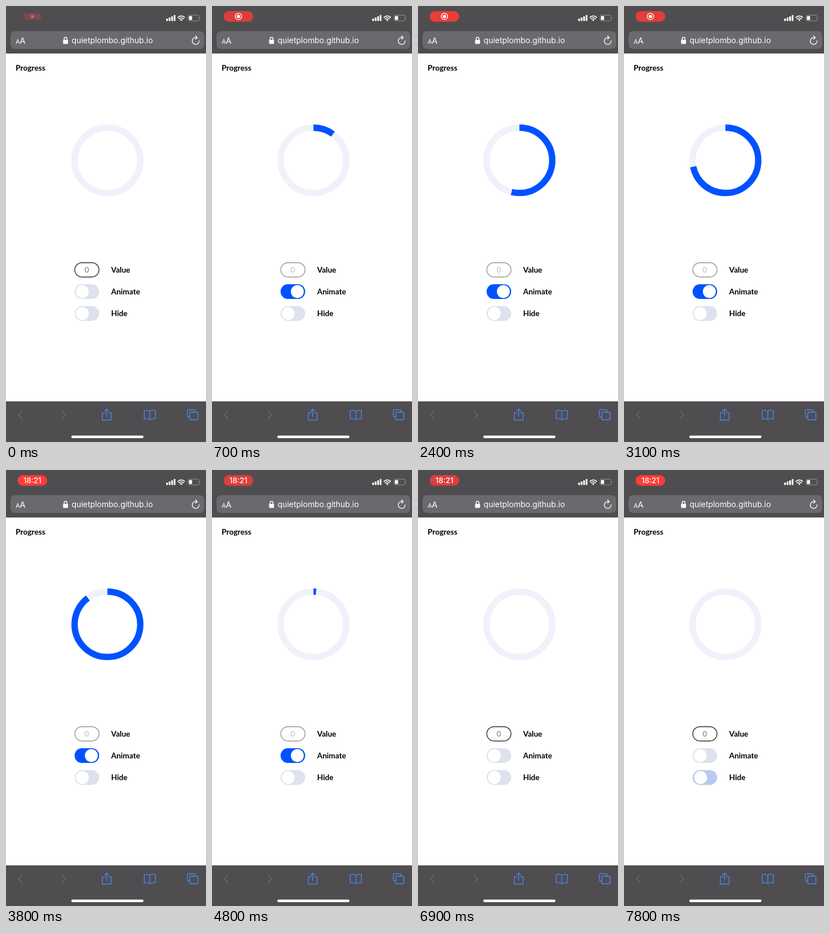
Animation of 352 by 762 pixels, one loop 8000 ms. Source, as an HTML page:

```html
<!DOCTYPE html>
<html lang="en">
<head>
<meta charset="utf-8">
<title>Progress</title>
<style>
  html, body { margin: 0; width: 100%; height: 100%; overflow: hidden; background: #fff; }
  svg { display: block; width: 100vw; height: 100vh; }
  .label { font: 700 13.6px Lato, sans-serif; fill: #000; }
  .ui { font-family: Inter, Roboto, sans-serif; fill: #fff; }
  .line { fill: none; stroke-linecap: round; stroke-linejoin: round; }
</style>
</head>
<body>
<svg viewBox="0 0 352 762">
  <rect width="352" height="762" fill="#fff"/>
  <path d="M0 0H352V83H0ZM0 691H352V762H0Z" fill="#4f4d50"/>

  <!-- status bar -->
  <g id="pill">
    <rect x="20.5" y="9" width="52" height="18.5" rx="9" fill="#ff3b36"/>
    <g id="dot">
      <circle cx="46.5" cy="18.2" r="5.6" fill="none" stroke="#fff" stroke-width="1.3"/>
      <circle cx="46.5" cy="18.2" r="3" fill="#fff"/>
    </g>
    <text id="clock" class="ui" x="46.5" y="23" font-size="13.2" font-weight="500" text-anchor="middle">18:21</text>
  </g>
  <g fill="#fff">
    <rect x="282" y="22" width="3" height="4.2" rx=".8"/>
    <rect x="286.4" y="20" width="3" height="6.2" rx=".8"/>
    <rect x="290.8" y="18" width="3" height="8.2" rx=".8"/>
    <rect x="295.2" y="15.8" width="3" height="10.4" rx=".8"/>
    <path d="M308.5 26.4L306.3 24.1A3.2 3.2 0 0 1 310.7 24.1Z"/>
  </g>
  <path class="line" stroke="#fff" stroke-width="1.8" stroke-linecap="butt" d="M302.7 19.8A8.3 8.3 0 0 1 314.3 19.8M304.8 22.3A5.4 5.4 0 0 1 312.2 22.3"/>
  <rect x="320.5" y="16" width="19.5" height="10" rx="2.8" fill="none" stroke="#939194"/>
  <rect x="322" y="17.5" width="5.5" height="7" rx="1.3" fill="#fff"/>
  <path d="M341.2 19.3Q343 21 341.2 22.7Z" fill="#939194"/>

  <!-- address bar -->
  <rect x="8" y="44" width="341" height="31" rx="8" fill="#6b696d"/>
  <text class="ui" x="17" y="65.5" font-size="11">A</text>
  <text class="ui" x="24.3" y="65.5" font-size="14.5">A</text>
  <rect x="100.5" y="59" width="8.6" height="7.2" rx="1.2" fill="#fff"/>
  <path class="line" stroke="#fff" stroke-width="1.4" d="M102.3 59V57.2A2.5 2.5 0 0 1 107.3 57.2V59"/>
  <text class="ui" x="187" y="65" font-size="13.9" text-anchor="middle">quietplombo.github.io</text>
  <path class="line" stroke="#fff" stroke-width="1.3" d="M339.8 60.6A6 6 0 1 1 334 55.2H336.2M333.6 52.3L336.6 55.2L333.6 58.1"/>

  <!-- page -->
  <text class="label" x="17" y="113.3">Progress</text>
  <g transform="translate(178.5 269.7) scale(1 .988) rotate(-90)" fill="none" stroke-width="11.2">
    <circle r="57.8" stroke="#eff2fa"/>
    <circle id="arc" r="57.8" stroke="#0052ff" pathLength="100"/>
  </g>
  <g id="value">
    <rect x="121.1" y="448.6" width="42.6" height="25" rx="12.5" fill="#fff" stroke="#111" stroke-width="1.2"/>
    <text x="142.3" y="465.6" text-anchor="middle" class="label" style="fill:#999">0</text>
  </g>
  <text class="label" x="185" y="465.6">Value</text>
  <g id="animate">
    <rect x="120.7" y="486.2" width="43.3" height="25.8" rx="12.9"/>
    <circle cy="499.1" r="11.4" fill="#fff"/>
  </g>
  <text class="label" x="185" y="503.8">Animate</text>
  <g id="hide">
    <rect x="120.7" y="524.6" width="43.3" height="25.8" rx="12.9"/>
    <circle cy="537.5" r="11.4" fill="#fff"/>
  </g>
  <text class="label" x="185" y="542">Hide</text>

  <!-- toolbar -->
  <path class="line" stroke="#6c6a6d" stroke-width="1.5" d="M28.5 708L21.5 714.5L28.5 721M98.5 708L105.5 714.5L98.5 721"/>
  <g class="line" stroke="#4788ee" stroke-width="1.4">
    <path d="M174 711H169.5V723.5H185V711H180.5M177.2 717.5V704.5M173.5 708L177.2 704.3L180.9 708"/>
    <path d="M253 708.5Q248 705 243.3 707.3V721.8Q248 720 253 723Q258 720 262.8 721.8V707.3Q258 705 253 708.5V723"/>
    <path d="M323 718.5H321.5Q319.3 718.5 319.3 716.3V707.7Q319.3 705.5 321.5 705.5H330.5Q332.7 705.5 332.7 707.7V709.5"/>
    <rect x="323.4" y="709.8" width="14.3" height="13.4" rx="2.2"/>
  </g>
  <rect x="115" y="750.8" width="127" height="4.4" rx="2.2" fill="#fff"/>
</svg>
<script>
const LOOP = 8000, ON = 200, OFF = 5900, HIDE = 7730, FADE = 300;
const FIRST = 305, RESET = 4300, SECOND = 4750, RATE = .0257;
const $ = id => document.getElementById(id);
const clamp = x => Math.min(1, Math.max(0, x));

// CSS "ease": cubic-bezier(.25, .1, .25, 1)
function ease(x) {
  x = clamp(x);
  let lo = 0, hi = 1, s;
  for (let i = 0; i < 20; i++) {
    s = (lo + hi) / 2;
    const bx = .75 * s * (1 - s) ** 2 + .75 * s * s * (1 - s) + s ** 3;
    if (bx < x) lo = s; else hi = s;
  }
  return .3 * s * (1 - s) ** 2 + 3 * s * s * (1 - s) + s ** 3;
}
const fade = (t, start) => ease((t - start) / FADE);

function progress(t) {
  if (t < RESET) return Math.min(100, Math.max(0, (t - FIRST) * RATE));
  if (t < SECOND) return 100 * (1 - fade(t, RESET));
  return (Math.min(t, OFF) - SECOND) * RATE * (1 - fade(t, OFF));
}

function setSwitch(id, k) {
  const [track, knob] = $(id).children;
  const mix = (a, b) => Math.round(a + (b - a) * Math.pow(k, .55));
  track.setAttribute('fill', `rgb(${mix(222, 0)},${mix(226, 82)},${mix(238, 255)})`);
  knob.setAttribute('cx', 134.2 + 16 * k);
}

function draw(t) {
  const p = progress(t);
  $('arc').setAttribute('stroke-dasharray', `${p} 200`);
  $('arc').setAttribute('visibility', p > .05 ? 'visible' : 'hidden');

  setSwitch('animate', fade(t, ON) - fade(t, OFF));
  setSwitch('hide', .1 * fade(t, HIDE));
  $('value').setAttribute('opacity', 1 - .5 * clamp((t - ON) / 150) + .5 * clamp((t - OFF) / 80));

  // the pill grows in, then pulses every two seconds
  const grow = clamp(t / 300), pulse = .9 + .1 * Math.cos(Math.PI * (t - 1800) / 1000);
  const size = .6 + .4 * grow;
  $('pill').setAttribute('transform', `translate(46.5 18.2) scale(${size}) translate(-46.5 -18.2)`);
  $('pill').firstElementChild.setAttribute('opacity', pulse * (.3 + .7 * grow));
  const swap = clamp((t - 3100) / 200);
  $('dot').setAttribute('opacity', (1 - swap) * (.3 + .7 * grow));
  $('clock').setAttribute('opacity', swap);
}

function tick(now) {
  draw(now % LOOP);
  requestAnimationFrame(tick);
}
draw(0);
requestAnimationFrame(tick);
</script>
</body>
</html>
```
